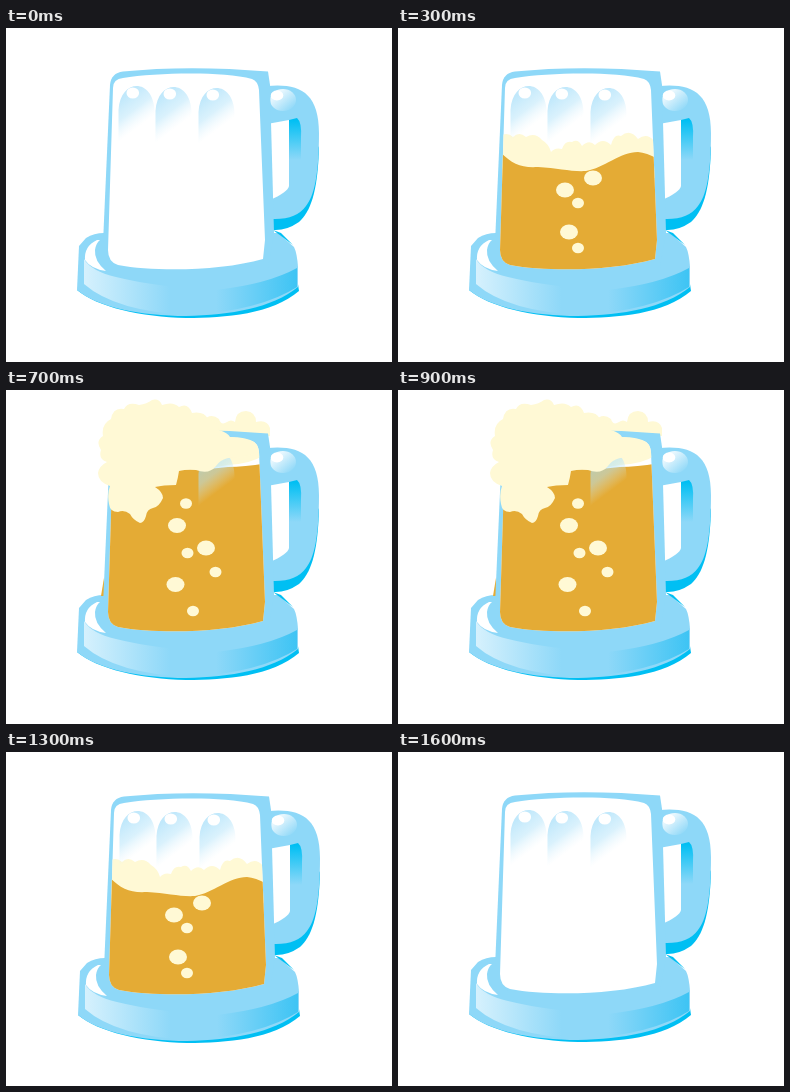
An HTML page without scripts that plays this animation: 386 by 334 pixels, repeating every 1700 ms.

```html
<!DOCTYPE html>
<html lang="en">
<head>
<meta charset="utf-8">
<title>Beer mug</title>
<style>
html, body { margin: 0; width: 100%; height: 100%; overflow: hidden; background: #fff; }
svg { display: block; width: 386px; height: 334px; }

.sky { fill: #8ed8f8; }
.cyan { fill: #00bff3; }
.white { fill: #fff; }
.beer { fill: #e4ab35; }
.foam, .bubbles { fill: #fff9d5; }

/* 17 steps of 100 ms: the mug fills until step 8, then plays back */
.scene, .pose, .covered { animation: 1.7s step-end infinite; }
.scene { animation-name: nudge; }
.covered { animation-name: cover; }
.pose { visibility: hidden; }
.p1 { animation-name: p1; }
.p2 { animation-name: p2; }
.p3 { animation-name: p3; }
.p4 { animation-name: p4; }
.p5 { animation-name: p5; }
.p6 { animation-name: p6; }
.p7 { animation-name: p7; }
.p8 { animation-name: p8; }
.full { animation-name: full; }

@keyframes nudge { 0%, 94.11% { transform: none } 58.82% { transform: translate(1px, 1px) } }
@keyframes cover { 0%, 58.82% { visibility: visible } 41.17% { visibility: hidden } }
@keyframes full { 0%, 70.58% { visibility: hidden } 29.41% { visibility: visible } }
@keyframes p1 { 0%, 11.76%, 94.11% { visibility: hidden } 5.88%, 88.23% { visibility: visible } }
@keyframes p2 { 0%, 17.64%, 88.23% { visibility: hidden } 11.76%, 82.35% { visibility: visible } }
@keyframes p3 { 0%, 23.52%, 82.35% { visibility: hidden } 17.64%, 76.47% { visibility: visible } }
@keyframes p4 { 0%, 29.41%, 76.47% { visibility: hidden } 23.52%, 70.58% { visibility: visible } }
@keyframes p5 { 0%, 35.29%, 70.58% { visibility: hidden } 29.41%, 64.7% { visibility: visible } }
@keyframes p6 { 0%, 41.17%, 64.7% { visibility: hidden } 35.29%, 58.82% { visibility: visible } }
@keyframes p7 { 0%, 47.05%, 58.82% { visibility: hidden } 41.17%, 52.94% { visibility: visible } }
@keyframes p8 { 0%, 52.94% { visibility: hidden } 47.05% { visibility: visible } }
</style>
</head>
<body>
<svg viewBox="0 0 386 334">
  <defs>
    <linearGradient id="rimShade">
      <stop offset="0" stop-color="#d6f1fd"/>
      <stop offset=".4" stop-color="#8ed8f8"/>
      <stop offset=".62" stop-color="#8ed8f8"/>
      <stop offset="1" stop-color="#3ec4f4"/>
    </linearGradient>
    <linearGradient id="glareShade" gradientUnits="userSpaceOnUse" x1="6" y1="10" x2="26" y2="36.600">
      <stop offset="0" stop-color="#9fdcf9" stop-opacity=".65"/>
      <stop offset=".5" stop-color="#b4e4fa" stop-opacity=".5"/>
      <stop offset="1" stop-color="#d8f1fc" stop-opacity="0"/>
    </linearGradient>
    <linearGradient id="gripShade" gradientUnits="userSpaceOnUse" x1="0" y1="92" x2="0" y2="132">
      <stop offset="0" stop-color="#00bff3"/>
      <stop offset="1" stop-color="#8ed8f8"/>
    </linearGradient>
    <linearGradient id="shine" x1=".1" y1=".1" x2=".9" y2=".9">
      <stop offset="0" stop-color="#fff"/>
      <stop offset="1" stop-color="#8ed8f8"/>
    </linearGradient>

    <path id="inner" d="M107 60Q107 51 117 50C150 45 215 43 246 51Q252 53 253 62L259 212 257 231C215 243 150 244 112 237Q102 234 102 222Z"/>
    <clipPath id="inside"><use href="#inner"/></clipPath>

    <ellipse id="big" rx="9" ry="7.6"/>
    <ellipse id="small" rx="6" ry="5.2"/>
    <path id="glare" fill="url(#glareShade)" fill-rule="evenodd" d="M0 56V24C2-8 35-8 36 25V46ZM8 7a6.3 5.5 0 1 0 12.6 0a6.3 5.5 0 1 0-12.6 0Z"/>

    <!-- foam band and beer, resting at the half-full level -->
    <g id="fill">
      <path class="foam" d="M100 109Q109 103 115 109Q121 103 128 109Q137 104 144 112Q151 116 153 124Q157 119 164 121Q167 112 174 114Q180 110 184 118Q191 111 197 117Q205 109 213 117Q216 105 223 108Q232 100 240 111Q249 104 256 113H264V150H100Z"/>
      <path class="beer" d="M100 122C114 136 122 140 140 139C160 140 174 144 188 143C206 140 222 124 240 124Q250 125 262 132V250H100Z"/>
    </g>
  </defs>

  <g class="scene">
    <!-- base -->
    <path class="cyan" d="M292 256L293 263C266 286 220 290 180 290C135 289 91 279 71 262Z"/>
    <path class="sky" d="M71 262L73 218 80 210Q88 205 98 205H272L288 219Q291 225 292 239V259C266 280 225 287 180 288C135 288 91 279 71 262Z"/>
    <path class="cyan" d="M267 202L275 205 287 217Z"/>
    <path fill="url(#rimShade)" d="M78 231Q85 243 110 249Q150 259 210 262Q262 256 291 240V259Q255 282 185 287Q110 284 78 256Z"/>
    <path class="white" d="M91 212Q78 218 79 232Q85 241 100 243Q88 233 89 222Q90 215 94 212Z"/>

    <!-- handle -->
    <path class="cyan" d="M313 118C312 165 304 184 293 194Q280 203 267 202V188Z"/>
    <path class="sky" d="M261 58C293 55 313 64 313 105C313 148 308 168 300 178Q290 192 266 191Z"/>
    <path class="white" d="M261 96L283 92V158Q282 164 264 172Z"/>
    <path fill="url(#gripShade)" d="M283 92L291 90Q296 94 295 110V135H283Z"/>
    <ellipse cx="277" cy="72" rx="13" ry="11" fill="url(#shine)"/>
    <ellipse class="white" cx="271" cy="67.500" rx="6.300" ry="5"/>

    <!-- foam rising behind the rim -->
    <path class="pose full foam" d="M107 46V39Q112 34 118 38Q125 33 133 37Q134 25 144 25Q152 26 153 35Q159 37 161 34Q170 25 178 34Q182 38 188 37Q190 28 196 32Q204 22 213 29Q215 36 221 32Q225 29 229 32Q230 21 240 21Q250 22 250 32Q261 29 264 38V46Z"/>
    <path class="pose p7 beer" d="M98 188L95 206H100Z"/>
    <path class="pose p8 beer" d="M98 178L94 206H100Z"/>
    <path class="pose p3 foam" d="M263 141L266 149 264 158Z"/>

    <!-- glass -->
    <path class="sky" d="M104 57Q105 45 117 43.500C160 39 210 39 262 43.500L264 57 268 205 262 240H110L97 215Z"/>
    <use href="#inner" class="white"/>

    <g clip-path="url(#inside)">
      <use class="pose p1" href="#fill" y="62"/>
      <use class="pose p2" href="#fill" y="31"/>
      <use class="pose p3" href="#fill"/>
      <use class="pose p4" href="#fill" y="-30"/>
      <g class="pose full">
        <path class="foam" d="M100 40H262V62Q248 74 222 75L180 82 100 80Z"/>
        <path class="beer" d="M100 73Q112 80 130 78Q150 75 175 79Q200 80 222 77Q240 77 262 73V250H100Z"/>
      </g>
      <path class="pose p5 white" d="M98 213Q106 230 119 240H98Z"/>
    </g>

    <!-- rising bubbles -->
    <g class="bubbles">
      <g class="pose p1">
        <use href="#big" x="165" y="222"/><use href="#big" x="191" y="214"/>
      </g>
      <g class="pose p2">
        <use href="#big" x="163" y="188"/><use href="#big" x="193" y="181"/>
        <use href="#small" x="182" y="202"/><use href="#big" x="171" y="226"/>
      </g>
      <g class="pose p3">
        <use href="#big" x="167" y="162"/><use href="#big" x="195" y="150"/>
        <use href="#small" x="180" y="175"/><use href="#big" x="171" y="204"/>
        <use href="#small" x="180" y="220"/>
      </g>
      <g class="pose p4">
        <use href="#big" x="172" y="144"/><use href="#small" x="187" y="125"/>
        <use href="#small" x="174" y="157"/><use href="#big" x="176" y="183"/>
        <use href="#big" x="160" y="205"/><use href="#small" x="178" y="213"/>
      </g>
      <g class="pose p5">
        <use href="#small" x="179" y="100"/><use href="#big" x="177" y="126"/>
        <use href="#small" x="168" y="139"/><use href="#big" x="181" y="162"/>
        <use href="#big" x="150" y="186"/><use href="#small" x="176" y="202"/>
        <use href="#big" x="183" y="228"/><use href="#small" x="198.500" y="234"/>
      </g>
      <g class="pose p6">
        <use href="#small" x="178" y="110"/><use href="#big" x="174" y="148"/>
        <use href="#small" x="176" y="127"/><use href="#big" x="190" y="172"/>
        <use href="#small" x="193" y="194"/><use href="#big" x="176" y="211"/>
        <use href="#small" x="191" y="229"/>
      </g>
      <g class="pose p7">
        <use href="#small" x="180" y="113.500"/><use href="#big" x="171" y="135.500"/>
        <use href="#small" x="181.500" y="163"/><use href="#big" x="200" y="158"/>
        <use href="#small" x="209.500" y="182"/><use href="#big" x="169.500" y="194.500"/>
        <use href="#small" x="187" y="221"/>
      </g>
      <g class="pose p8">
        <use href="#big" x="174" y="118"/><use href="#small" x="181" y="145"/>
        <use href="#big" x="202" y="140"/><use href="#small" x="206" y="164"/>
        <use href="#big" x="171" y="176"/><use href="#small" x="186" y="203"/>
        <use href="#big" x="178" y="226"/>
      </g>
    </g>

    <!-- reflections -->
    <g class="covered">
      <use href="#glare" x="112.500" y="58"/>
      <use href="#glare" x="149.500" y="59"/>
    </g>
    <use href="#glare" x="192.500" y="60"/>

    <!-- foam spilling over -->
    <path class="pose p6 foam" d="M96 66Q91 56 99 50Q94 36 106 31Q106 18 118 19Q122 7 135 11Q147 0 158 8Q171 4 177 14Q190 13 193 24Q206 22 209 32Q221 36 217 47Q226 56 216 64Q210 74 196 71Q184 84 171 77Q158 86 148 79Q139 92 128 86Q112 95 104 85Q95 77 96 66Z"/>
    <path class="pose p7 foam" d="M95 60Q89 51 97 46Q95 34 105 29Q107 17 118 19Q122 11 133 15Q141 14 146 10Q153 8 156 15Q167 11 173 17Q182 12 186 23Q198 21 202 29Q212 31 213 40Q222 43 224 47Q240 47 248 52L252 62Q238 68 222 68Q214 70 210 76Q203 85 190 80Q181 79 173 81Q172 88 170 95Q157 95 149 97Q157 102 157 108Q153 117 147 118Q141 119 140 126Q138 133 134 133Q127 130 124 124Q118 119 112 122Q104 122 103 114Q101 104 104 96Q92 92 92 83Q93 76 101 72Q92 69 95 60Z"/>
    <path class="pose p8 foam" d="M91 64Q86 53 95 48Q93 36 104 33Q106 20 118 23Q124 14 135 19Q146 11 156 18Q168 13 175 21Q187 18 190 27Q204 25 207 34Q220 36 219 46L250 53V64Q235 70 218 69Q211 81 199 82Q188 91 176 84Q170 97 157 97Q153 102 157 110Q160 118 152 125Q142 131 141 140Q142 154 130 157Q119 160 114 147Q101 144 104 132Q98 120 102 109Q89 102 91 90Q87 81 95 75Z"/>
  </g>
</svg>
</body>
</html>
```
